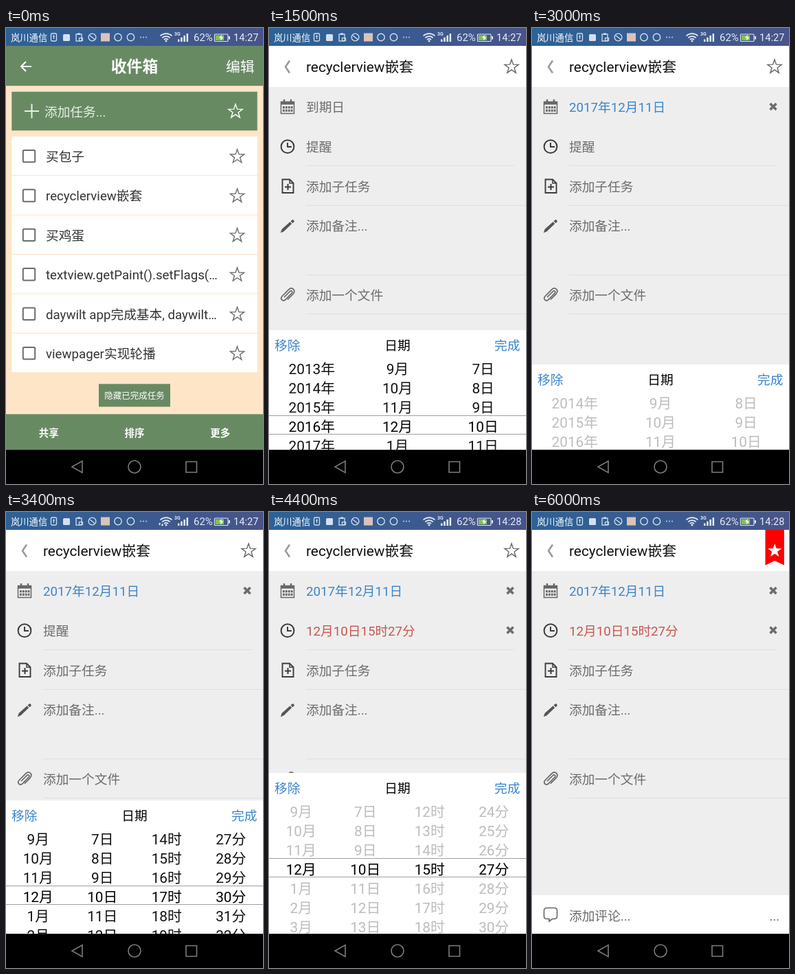
Write an HTML page that moves like this. It is 374x664 px and loops after 6.4 s.

```html
<!DOCTYPE html>
<html lang="zh-CN">
<head>
<meta charset="utf-8">
<title>收件箱</title>
<style>
  html, body { margin: 0; width: 100%; height: 100%; overflow: hidden; background: #000; }
  svg { display: block; width: 374px; height: 664px; }
  text { font-family: Roboto, "Noto Sans CJK SC", "Noto Sans CJK", sans-serif; white-space: pre; }
</style>
</head>
<body>
<svg id="stage" viewBox="0 0 374 664" fill="none"></svg>
<script>
const LOOP = 6400, STEP = 100;
const GREEN = '#688a63', GREY = '#6c6c6c', DARK = '#3c3c3c', BLUE = '#3a85cb', RED = '#c8564f';

// --- drawing helpers -------------------------------------------------
const rect = (x, y, w, h, fill, more = '') =>
  `<rect x="${x}" y="${y}" width="${w}" height="${h}" fill="${fill}" ${more}/>`;
const line = (d, color, width = 1, more = '') =>
  `<path d="${d}" stroke="${color}" stroke-width="${width}" ${more}/>`;
const ring = (x, y, r, color, width) =>
  `<circle cx="${x}" cy="${y}" r="${r}" stroke="${color}" stroke-width="${width}"/>`;
const dot = (x, y, r, fill) => `<circle cx="${x}" cy="${y}" r="${r}" fill="${fill}"/>`;
// y is the visual middle of the line of text
const label = (s, x, y, size, fill, more = '') =>
  `<text x="${x}" y="${(y + size * 0.36).toFixed(2)}" font-size="${size}" fill="${fill}" ${more}>${s}</text>`;
const centered = (s, x, y, size, fill, more = '') =>
  label(s, x, y, size, fill, 'text-anchor="middle" ' + more);

function starPath(x, y, r) {
  let d = '';
  for (let i = 0; i < 10; i++) {
    const a = Math.PI * (i / 5 - 0.5), q = i % 2 ? r * 0.4 : r;
    d += (i ? 'L' : 'M') + (x + q * Math.cos(a)).toFixed(2) + ' ' + (y + q * Math.sin(a)).toFixed(2);
  }
  return d + 'z';
}
const star = (x, y, color) => line(starPath(x, y + 0.6, 10.6), color, 1.4);

// --- status and navigation bars -------------------------------------
function statusBar() {
  const pale = '#d5e0ee';
  let s = rect(0, 0, 374, 26, 'url(#sky)');
  s += label('岚川通信', 7, 14, 13.3, '#fff', 'font-weight="500"');
  s += rect(65.5, 8, 8, 11, 'none', `rx="1.5" stroke="${pale}" stroke-width="1.3"`) +
       line('M69.5 10.5V16M68 12h3', pale, 1.2);
  s += rect(83, 9, 10, 10, pale, 'rx="1.5"');
  s += rect(102, 9, 8, 10, 'none', `stroke="${pale}" stroke-width="1.3"`) +
       rect(104, 7.5, 4, 2.5, pale) + line('M106.5 14.5h5v4h-5z', pale, 1.2);
  s += ring(125.5, 13.5, 5.4, pale, 1.3) + line('M122 11l7 5.5', pale, 1.3);
  s += rect(138, 7.5, 13, 12, '#dcc3b8');
  s += ring(163, 13.5, 5.2, pale, 1.4) + ring(181.5, 13.5, 5.2, pale, 1.4);
  s += [196, 200, 204].map(x => dot(x, 13.5, 0.9, pale)).join('');
  s += line('M224.5 11.5a12.5 12.5 0 0 1 17 0M227.3 14.3a8.5 8.5 0 0 1 11.4 0M230 17a4.6 4.6 0 0 1 6 0', '#e6edf5', 1.7);
  s += dot(233, 19, 1.4, '#e6edf5');
  s += label('3G', 245, 8, 7, '#fff', 'font-weight="500"');
  for (let i = 0; i < 4; i++) s += rect(250 + i * 4.2, 16.5 - i * 2.8, 2.5, 3.5 + i * 2.8, '#e6edf5');
  s += label('62%', 273, 14, 15, '#e6edf5');
  s += rect(303.5, 9, 19.5, 10.5, 'none', 'rx="1" stroke="#dfe7ef" stroke-width="1.2"') +
       rect(324, 12, 2, 4.5, '#dfe7ef') + rect(305, 10.5, 12, 7.5, '#7fc34f') +
       `<path d="M314 9.8l-4.2 4.8h3l-1 4 4.8-5.2h-3.2z" fill="#fff"/>`;
  return s + '<path id="traffic" d="M222 16.3h3.2l-1.6 3.6zM225.9 19.9h3.2l-1.6-3.6z" fill="#e6edf5"/>' +
    label('', 331, 14, 14.6, '#e6edf5', 'id="clock"');
}
function navBar() {
  const c = '#7c7c7c';
  return rect(0, 614.2, 374, 49.8, '#000') +
    line('M111 630.5v17L96 639z', c, 1.6) + ring(187, 639, 9, c, 1.6) +
    line('M262 631.5h15.5v15.5h-15.5z', c, 1.6);
}

// --- inbox page -------------------------------------------------------
function inboxPage() {
  const tasks = ['买包子', 'recyclerview嵌套', '买鸡蛋', 'textview.getPaint().setFlags(…',
    'daywilt app完成基本, daywilt…', 'viewpager实现轮播'];
  const left = 8.3, width = 357.4;
  let s = rect(0, 26, 374, 589, '#ffe5c8') + rect(0, 26, 374, 58.2, GREEN);
  s += line('M37 56H22.5M29 49l-7 7 7 7', '#fff', 2);
  s += centered('收件箱', 187, 56, 22.8, '#fff', 'font-weight="700"') + label('编辑', 320, 56.5, 20.8, '#fff');
  s += rect(left, 92.8, width, 56.5, GREEN) + line('M27 121h21M37.5 110.5v21', '#e9efe7', 2);
  s += label('添加任务...', 56, 122, 18.7, '#e9efe7') + star(334, 121, '#fff');
  tasks.forEach((name, i) => {
    const y = 186.7 + i * 57.4;
    s += rect(left, y - 28.7, width, 56.2, '#fff');
    s += rect(24.8, y - 8.8, 17.4, 17.4, 'none', `rx="1.5" stroke="${GREY}" stroke-width="2"`);
    s += label(name, 58, y + 0.5, 18.7, '#333') + star(336.5, y, GREY);
  });
  s += rect(135, 518.3, 104, 33.2, GREEN) + centered('隐藏已完成任务', 187, 535.5, 12.5, '#fff', 'font-weight="500"');
  s += rect(0, 562.3, 374, 52, GREEN);
  ['共享', '排序', '更多'].forEach((name, i) =>
    s += centered(name, 62.3 + i * 124.7, 589.5, 14.5, '#fff', 'font-weight="700"'));
  return s;
}

// --- task page --------------------------------------------------------
function taskIcons() {
  let s = rect(17.5, 107.5, 19, 17, 'none', 'stroke="#666" stroke-width="1.5"') +
    rect(17, 107, 20, 4.5, '#666') + line('M22 104v4M32 104v4', '#666', 2.4);
  for (let i = 0; i < 8; i++)
    s += rect(20 + (i % 4) * 3.9, 114 + Math.floor(i / 4) * 4.6, 2.8, 3.2, '#666');
  s += ring(27, 172.7, 9.4, DARK, 2) + line('M27 167v6h6', DARK, 2);
  s += line('M19.5 220.5h10.5l5.5 5.5v14h-16z', DARK, 1.9) + line('M30 220.5v5.5h5.5', DARK, 1.5) +
    line('M27.5 227v9M23 231.5h9', DARK, 2);
  s += '<path d="M16.8 298.2l1.8-5.2 12-10.8 2.6 2.8-11.6 11.2zM31.6 281.2l2-1.8q1-.8 2 .2l.8.9q.9 1 0 1.900l-2.100 1.900z" fill="#555"/>';
  s += line('M22.5 391.5l8-8c2-2 4.6.5 2.7 2.5l-9 9.300c-4 3.800-8.700-.800-5-4.800l9.500-9.700c5-4.700 11 1.200 6.300 6.500l-7.500 7.700', '#666', 1.700, 'stroke-linecap="round"');
  s += line('M21.5 576.500h11q4 0 4 4v8q0 4-4 4h-3l-4.500 3.500v-3.500h-3.500q-4 0-4-4v-8q0-4 4-4z', '#666', 1.600);
  return s;
}
const cross = (id, y) =>
  line(`M346.5 ${y - 4.5}l9 9m0-9l-9 9`, '#6c6c6c', 3.6, `id="${id}"`);

function taskPage() {
  let s = rect(0, 26, 374, 589, '#eee') + rect(0, 26, 374, 60, '#fff');
  s += line('M30 47.5l-6 9 6 9', '#9a9a9a', 2.6) + label('recyclerview嵌套', 54, 57, 20.8, '#111');
  s += star(353, 56, '#666');
  s += '<g id="ribbon"><path d="M339.5 26h27.5v51.5l-13.7-6.5-13.8 6.5z" fill="#fe0000"/>' +
    `<path d="${starPath(353.2, 56.5, 10.5)}" fill="#fff"/></g>`;
  s += label('', 54, 115.5, 18.7, GREY, 'id="due"') + label('', 54, 173.2, 18.7, GREY, 'id="remind"');
  s += cross('dueCross', 114.5) + cross('remindCross', 172);
  [['添加子任务', 231], ['添加备注...', 288.5], ['添加一个文件', 389.5]].forEach(([name, y]) =>
    s += label(name, 54, y, 18.7, GREY));
  s += line('M54 200.5H357M54 258.5H374M54 359.5H374M54 416.5H374', '#dedede');
  s += rect(0, 558, 374, 57, '#fff') + label('添加评论...', 54, 588, 18.7, GREY) + label('...', 345.5, 588, 18.7, GREY);
  return s + taskIcons();
}

// --- wheel picker -----------------------------------------------------
const wrap = (n, lo, count) => ((n - lo) % count + count) % count + lo;
const units = {
  year: n => n + '年',
  month: n => wrap(n, 1, 12) + '月',
  day: n => wrap(n, 1, 31) + '日',
  hour: n => wrap(n, 0, 24) + '时',
  minute: n => wrap(n, 0, 60) + '分'
};
function wheels(values, settled) {
  const names = Object.keys(values), width = 374 / names.length;
  const rows = color => names.map((name, c) => {
    const v = values[name], mid = Math.round(v);
    let s = '';
    for (let n = mid - 4; n <= mid + 4; n++)
      s += centered(units[name](n), width * (c + 0.5), 141 + (n - v) * 28, 20.8, color);
    return s;
  }).join('');
  return `<g clip-path="url(#drum)">${rows(settled ? '#bdbdbd' : '#111')}</g>` +
    rect(0, 124.5, 374, 27, '#fff') + line('M0 124.5H374M0 151.5H374', '#9e9e9e') +
    `<g clip-path="url(#band)">${rows('#000')}</g>`;
}
const picker = () => rect(0, 0, 374, 235, '#fff') + label('移除', 8, 22.5, 18.7, BLUE) +
  centered('日期', 187, 22.5, 18.7, '#000') + label('完成', 328, 22.5, 18.7, BLUE) + '<g id="wheels"></g>';

// --- scene ------------------------------------------------------------
const $ = id => document.getElementById(id);
$('stage').innerHTML = `<defs>
  <linearGradient id="sky"><stop stop-color="#2c6297"/><stop offset="1" stop-color="#485489"/></linearGradient>
  <clipPath id="drum"><rect y="42" width="374" height="193"/></clipPath>
  <clipPath id="band"><rect y="125" width="374" height="26"/></clipPath></defs>
  <g id="inbox">${inboxPage()}</g><g id="task">${taskPage()}</g>
  <g id="picker">${picker()}</g>${statusBar()}${navBar()}`;

// piecewise linear track of [time, value] points
function track(t, points) {
  let [t0, v0] = points[0];
  for (const [t1, v1] of points) {
    if (t < t1) return t <= t0 ? v0 : v0 + (v1 - v0) * (t - t0) / (t1 - t0);
    [t0, v0] = [t1, v1];
  }
  return v0;
}
const within = (t, ...spans) => spans.some(([a, b]) => t >= a && t < b);
const show = (id, on) => $(id).setAttribute('visibility', on ? 'visible' : 'hidden');
const move = (id, x, y) => $(id).setAttribute('transform', `translate(${x} ${y})`);
function write(id, s, color) {
  $(id).textContent = s;
  $(id).setAttribute('fill', color);
}
const near = v => Math.ceil(v - 0.5);

function render(t) {
  const x = track(t, [[800, 374], [900, 335], [1000, 202], [1100, 0]]);
  move('inbox', x - 374, 0);
  move('task', x, 0);

  const drop = track(t, [[1300, 235], [1400, 190], [1500, 60], [1600, 0], [2900, 0], [3000, 110], [3100, 235],
    [3300, 235], [3400, 40], [3500, 0], [4500, 0], [4600, 110], [4700, 235]]);
  show('picker', drop < 235);
  move('picker', 0, 380 + drop);

  const dueSet = t >= 1800, remindSet = t >= 3700;
  const due = {
    year: track(t, [[2500, 2016], [2600, 2016.55], [2700, 2017]]),
    month: 12,
    day: dueSet ? track(t, [[1800, 7], [1900, 7.4], [2000, 8.5], [2100, 9.8], [2200, 10.7], [2300, 11]]) : 10
  };
  const remind = {
    month: 12,
    day: remindSet ? track(t, [[3800, 7], [3900, 7.15], [4000, 7.48], [4100, 8.7], [4200, 9.8], [4300, 10]]) : 10,
    hour: remindSet ? track(t, [[4100, 14], [4200, 14.3], [4300, 14.75], [4400, 15]]) : 17,
    minute: remindSet ? 27 : 30
  };
  $('wheels').innerHTML = t < 3300 ? wheels(due, dueSet) : wheels(remind, remindSet);

  const say = values => Object.keys(values).map(k => units[k](near(values[k]))).join('');
  write('due', dueSet ? say(due) : '到期日', dueSet ? BLUE : GREY);
  write('remind', remindSet ? say(remind) : '提醒', remindSet ? RED : GREY);
  show('dueCross', dueSet);
  show('remindCross', remindSet);
  show('ribbon', t >= 5100);
  show('traffic', within(t, [300, 500], [900, 1400], [3400, 4300], [5400, 6000]));
  $('clock').textContent = t < 3700 ? '14:27' : '14:28';
}

let start = null, last = -1;
function tick(now) {
  if (start === null) start = now;
  const t = Math.floor(((now - start) % LOOP) / STEP) * STEP;
  if (t !== last) render(last = t);
  requestAnimationFrame(tick);
}
render(0);
requestAnimationFrame(tick);
</script>
</body>
</html>
```
